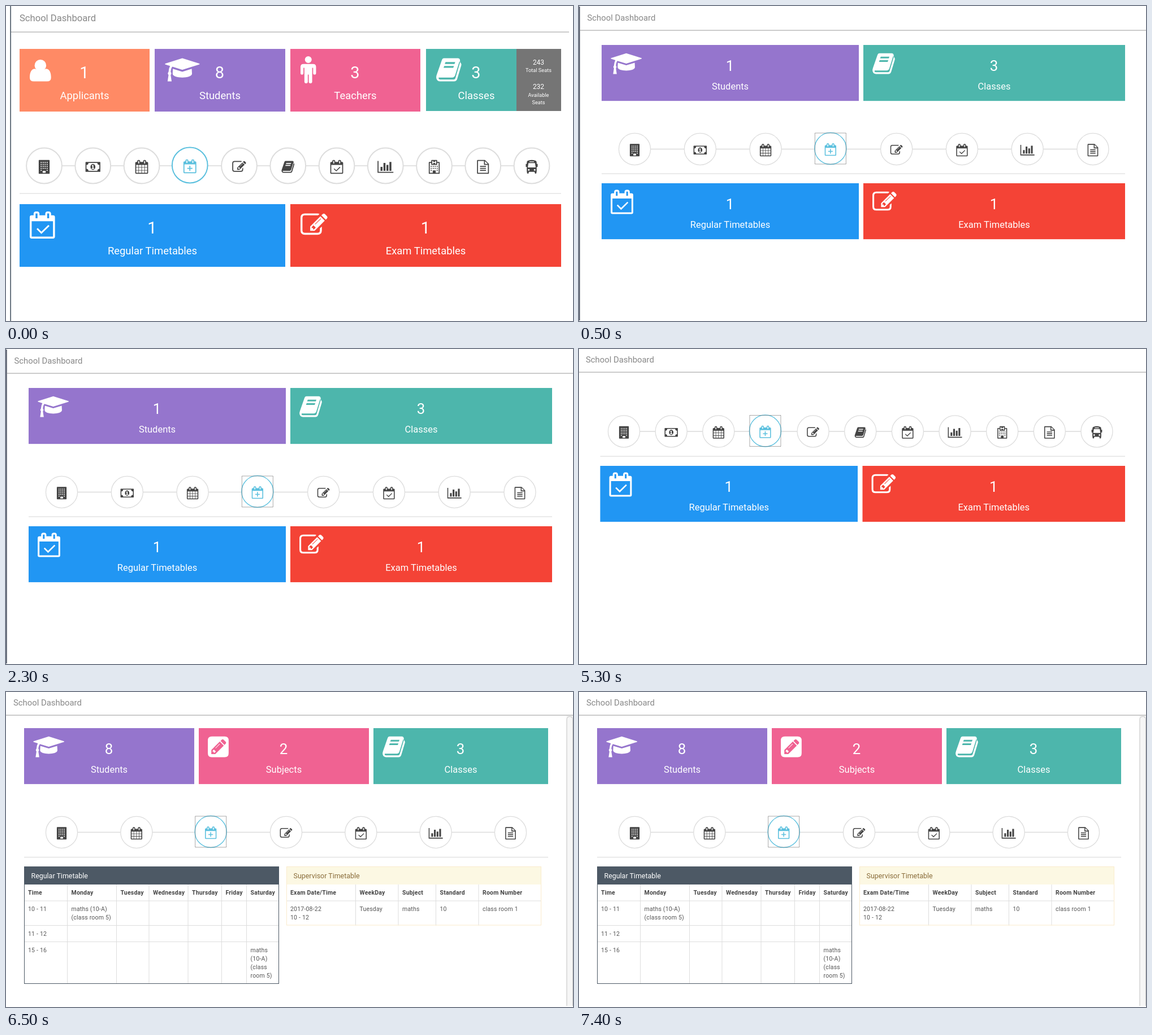
An HTML page that plays this animation: 1003x558 px, repeating every 8000 ms.

```html
<!DOCTYPE html>
<html lang="en">
<head>
<meta charset="utf-8">
<title>School Dashboard</title>
<style>
  html, body { margin: 0; width: 100%; height: 100%; overflow: hidden; background: #fff; }
  svg { display: block; width: 1003px; height: 558px; font-family: Roboto, sans-serif; }
  .cell { font-size: 10.5px; letter-spacing: .2px; }
</style>
</head>
<body>
<svg id="stage" viewBox="0 0 1003 558"></svg>
<script>
const BLUE = '#2196f3', RED = '#f44336', PURPLE = '#9575cd', PINK = '#f06292', TEAL = '#4db6ac';
const SLATE = '#4d5965', ACTIVE = '#5bc0de';

// Icons live on a 14-unit grid: [width, even-odd path]
const box = (x, y, w = 1, h = 1) => `M${x} ${y}h${w}v${h}h${-w}z`;
const grid = (xs, ys, w, h) => xs.map(x => ys.map(y => box(x, y, w, h)).join('')).join('');
const disc = (x, y, r, ry = r) => `M${x - r} ${y}a${r} ${ry} 0 0 1 ${2 * r} 0a${r} ${ry} 0 0 1 ${-2 * r} 0z`;
const planner = 'M1 2H2V1.2Q2.1 0 3.2 0H3.8Q4.9 0 5 1.2V2H8V1.2Q8.1 0 9.2 0H9.8Q10.9 0 11 1.2V2H12Q13 2 13 3V13Q13 14 12 14H1Q0 14 0 13V3Q0 2 1 2Z'
  + box(3, 1, 1, 2.5) + box(9, 1, 1, 2.5);
const icons = {
  building: [11, 'M.5 0H10.5Q11 0 11 .5V13.5Q11 14 10.5 14H.5Q0 14 0 13.5V.5Q0 0 .5 0Z'
    + grid([2, 4, 6, 8], [2, 4, 6, 8]) + grid([2, 8], [10]) + box(4, 11, 3, 2)],
  money: [15, 'M.5 2H14.5Q15 2 15 2.5V11.5Q15 12 14.5 12H.5Q0 12 0 11.5V2.5Q0 2 .5 2Z'
    + 'M3 3Q3 5 1 5V9Q3 9 3 11H12Q12 9 14 9V5Q12 5 12 3Z' + disc(7.5, 7, 2.5, 3)
    + 'M6.3 5.7L7.2 5H8V8.3H8.8V9.1H6.2V8.3H7V6.1L6.7 6.3Z'],
  calendar: [13, planner + [5, 7.75, 10.75].map((y, i) => [1, 3.75, 6.75, 9.75].map((x, j) =>
    box(x, y, j % 3 ? 2.5 : 2.25, i == 1 ? 2.5 : 2.25)).join('')).join('')],
  plus: [13, planner + box(1, 5, 11, 8) + 'M6 6.4h1v2.1h2.1v1H7v2.1H6V9.5H3.9v-1H6z'],
  check: [13, planner + box(1, 5, 11, 8) + 'M3.5 9.1L4.1 8.5 6 10.4 9.6 6.9 10.2 7.5 6 11.6Z'],
  edit: [14, 'M2.25 1H8.75Q9.3 1 9.8 1.3L9 2H2.25Q1 2 1 3.25V9.75Q1 11 2.25 11H8.75Q10 11 10 9.75V8.7L11 7.8V9.75Q11 12 8.75 12H2.25Q0 12 0 9.75V3.25Q0 1 2.25 1Z'
    + 'M10.25 2.5L12.5 4.75 7.25 10H5V7.75ZM6.94 9.25L7.84 8.34 6.66 7.16 5.75 8.06V8.5H6.5V9.25Z'
    + 'M10.4 3.6L7.4 6.5 7.6 6.7 10.6 3.8ZM13.7 3.55L13 4.25 10.75 2 11.45 1.3Q12 .9 12.55 1.3L13.7 2.45Q14.1 3 13.7 3.55Z'],
  book: [13, 'M4 1H11.3Q12.3 1.1 12.3 2.4V2.9L12.8 3.7Q13.1 4.2 12.9 4.8L10.8 11.8Q10.4 13 9.2 13H2Q.6 13 .1 11.5Q-.1 10.5 .3 9.5L2.8 2.3Q3.2 1 4 1Z'
    + 'M1.3 11H8.2Q9.4 11 9.8 9.7L12 2.6 12.3 3.2 10 11Q9.8 12 9 12H2Q1 11.9 1.3 11Z'
    + 'M4.8 3h5l-.35 1h-5zM4.15 5h5l-.35 1h-5z'],
  chart: [16, box(0, 1, 1, 12) + box(1, 12, 15, 1) + box(3, 7, 2, 4) + box(6, 3, 2, 8) + box(9, 5, 2, 6) + box(12, 2, 2, 9)],
  hospital: [11, 'M.5 2H2.5V.5Q2.5 0 3 0H8Q8.5 0 8.5 .5V2H10.5Q11 2 11 2.5V13.5Q11 14 10.5 14H.5Q0 14 0 13.5V2.5Q0 2 .5 2Z'
    + 'M1 3V13H4V10.5H7V13H10V3H8.5V5H2.5V3ZM3.5 1h1v1h2V1h1v3h-1V3h-2v1h-1z'
    + grid([2, 4, 6, 8], [6, 8]) + grid([2, 8], [10])],
  file: [12, 'M.75 0H8L12 4V13.25Q12 14 11.25 14H.75Q0 14 0 13.25V.75Q0 0 .75 0ZM1 1V13H11V5H7V1ZM8 1.1V4H10.9Z'
    + grid([3], [6, 8, 10], 6, 1)],
  bus: [12, 'M1 3Q1 .9 2.5 .6Q6 -.6 9.5 .6Q11 .9 11 3V4H12V7H11V12H10.8V13.2Q10 14.6 9 13.2V12H3V13.2Q2 14.6 1.2 13.2V12H1V7H0V4H1Z'
    + 'M2.7 3.2H9.3L10 7.6H2ZM3.7 1.4h4.6v.8H3.7z' + disc(3, 10, .9) + disc(9, 10, .9)],
  user: [11, 'M2.7 6.5Q2.9 6.5 3.4 6.9A3 3 0 1 1 7.6 6.9Q8.1 6.5 8.3 6.5C10.3 6.5 11 8.6 11 11Q11 13 8.9 13H2.1Q0 13 0 11C0 8.6 .7 6.5 2.7 6.5Z'],
  cap: [18, 'M.2 3.8L9 1 17.8 3.8Q18.1 4 17.8 4.2L9 7 3.9 5.4Q3.2 6 3 8.1Q3.7 8.9 3 9.7L3.5 13H1.4L1.9 9.7Q1.2 8.9 1.9 8.1Q2 6.2 2.7 5L.2 4.2Q-.1 4 .2 3.8Z'
    + 'M4.14 6.5L9 8 13.86 6.5 14 9C14 11.7 4 11.7 4 9Z'],
  person: [8, disc(4, 1.75, 1.75) + 'M1.5 4H6.5Q8 4 8 5.5V8.75a.75 .75 0 0 1-1.5 0V6H6V13.1a.87 .87 0 0 1-1.75 0V9.5h-.5v3.6a.87 .87 0 0 1-1.75 0V6H1.5V8.75a.75 .75 0 0 1-1.5 0V5.5Q0 4 1.5 4Z'],
  pencil: [12, 'M2.25 1H9.75Q12 1 12 3.25V10.75Q12 13 9.75 13H2.25Q0 13 0 10.75V3.25Q0 1 2.25 1Z'
    + 'M2 11.2V8.9L6.9 4 9.2 6.3 4.3 11.2ZM2.8 9.3L3.5 8.6 4.6 9.7 3.9 10.4H3.4V9.8H2.8Z'
    + 'M6.7 5.3L4.3 7.7 4.5 7.9 6.9 5.5ZM7.3 3.6L8.1 2.8Q8.6 2.5 9 2.8L10.4 4.2Q10.7 4.6 10.4 5.1L9.6 5.9Z']
};

const rect = (x, y, x2, y2, fill, extra = '') =>
  `<rect x="${x}" y="${y}" width="${x2 - x}" height="${y2 - y}" fill="${fill}" ${extra}/>`;
const text = (x, y, str, size, fill = '#fff', extra = 'text-anchor="middle"') =>
  `<text x="${x}" y="${y}" font-size="${size}" fill="${fill}" ${extra}>${str}</text>`;
const icon = (name, x, y, scale, fill = '#fff') =>
  `<path d="${icons[name][1]}" fill="${fill}" fill-rule="evenodd" transform="translate(${x} ${y}) scale(${scale})"/>`;

const header = (x, base, lineY, left, right, size) =>
  text(x, base, 'School Dashboard', size, '#888', '') + rect(left, lineY - .5, right, lineY + .7, '#aaa');

function card(x, x2, y, k, color, name, count, label) {
  const mid = (x + x2) / 2;
  return rect(x, y, x2, y + 111 * k, color)
    + icon(name, x + 18 * k, y + 13 * k, 3.43 * k)
    + text(mid - .5, y + 52 * k, count, 29 * k)
    + text(mid, y + 89 * k, label, 18.45 * k);
}

function steps(names, first, last, y, k, dividerY, left, right) {
  const r = 31.4 * k, gap = (last - first) / (names.length - 1);
  let out = rect(first, y - .8, last, y + .8, '#ddd');
  names.forEach((name, i) => {
    const on = name == 'plus', x = first + i * gap - on, cy = y - on, s = 1.75 * k;
    out += `<circle cx="${x}" cy="${cy}" r="${r}" fill="#fff" stroke="${on ? ACTIVE : '#ddd'}" stroke-width="${k == 1 ? 2 : 1.3}"/>`;
    if (on && k < 1) out += rect(x - 27.5, cy - 27.5, x + 27.5, cy + 27.5, 'none', 'stroke="#555" stroke-dasharray="1 1"');
    out += icon(name, x - icons[name][0] / 2 * s, cy + 2 * k - 7 * s, s, on ? ACTIVE : '#444');
  });
  return out + rect(left, dividerY - .5, right, dividerY + .7, '#ddd');
}

const timetables = (x, x2, x3, x4, y, k) =>
  card(x, x2, y, k, BLUE, 'check', 1, 'Regular Timetables') + card(x3, x4, y, k, RED, 'edit', 1, 'Exam Timetables');

// rows: arrays of cells, "|" breaks a line inside a cell
function table(title, cols, lines, rows, fill, ink, border) {
  const left = cols[0], right = cols[cols.length - 1], bottom = lines[lines.length - 1];
  let out = rect(left, 309, right, 341, fill) + text(left + 12.5, 330, title, 12.45, ink, '');
  lines.slice(1, -1).forEach(y => out += rect(left, y - .5, right, y + .5, '#ddd'));
  cols.slice(1, -1).forEach(x => out += rect(x - .5, 341, x + .5, bottom, '#ddd'));
  rows.forEach((row, r) => row.forEach((cell, c) => cell.split('|').forEach((line, i) =>
    out += text(cols[c] + 7, lines[r] + 18.3 + i * 15, line, 10.5, r ? '#555' : '#444',
      `class="cell" font-weight="${r ? 400 : 700}"`))));
  return out + rect(left + .5, 309.5, right - .5, bottom - .5, 'none', `stroke="${border}"`);
}

const K = .893;
const all = ['building', 'money', 'calendar', 'plus', 'edit', 'book', 'check', 'chart', 'hospital', 'file', 'bus'];
const without = (...drop) => all.filter(n => !drop.includes(n));

const admin = rect(7.3, 0, 9, 558, '#52606d') + header(24, 26.5, 46, 9, 996, 16.6)
  + card(24, 254, 76, 1, '#ff8a65', 'user', 1, 'Applicants')
  + card(263, 494, 76, 1, PURPLE, 'cap', 8, 'Students')
  + card(503, 733, 76, 1, PINK, 'person', 3, 'Teachers')
  + card(743, 921, 76, 1, TEAL, 'book', 3, 'Classes')
  + rect(903, 76, 982, 187, '#757575') + rect(743, 186, 982, 187, '#fff')
  + text(942, 103.5, 243, 12) + text(942, 117, 'Total Seats', 9.2)
  + text(942, 147, 232, 12) + text(942, 160.5, 'Available', 9.2) + text(942, 173.5, 'Seats', 9.2)
  + steps(all, 67.5, 930, 283, 1, 332, 24, 982)
  + timetables(24, 494, 503, 982, 351, 1);

const parent = rect(0, 1, 1.7, 557, '#555c6a') + header(14.5, 25.5, 43, 2, 1003, 14.85)
  + card(40, 495, 69, K, PURPLE, 'cap', 1, 'Students')
  + card(503, 966, 69, K, TEAL, 'book', 3, 'Classes')
  + steps(without('book', 'hospital', 'bus'), 98.5, 909, 253.5, K, 297, 40, 966)
  + timetables(40, 495, 503, 966, 314, K);

const staff = header(12, 24, 41, 0, 1003, 14.85)
  + steps(all, 79.5, 916, 146, K, 190, 37.5, 966)
  + timetables(37.5, 493, 501.5, 966, 207, K);

const teacher = header(13, 24, 41, 0, 1003, 14.85)
  + rect(991.5, 42, 1003, 556, '#f0f0f0') + rect(992, 43.5, 1002.5, 562, '#f6f6f6', 'rx="5" stroke="#c4c4c4"')
  + rect(985, 556, 1003, 558, '#fff')
  + card(32, 333, 64, K, PURPLE, 'cap', 8, 'Students')
  + card(341, 642, 64, K, PINK, 'pencil', 2, 'Subjects')
  + card(650, 959, 64, K, TEAL, 'book', 3, 'Classes')
  + steps(without('money', 'book', 'hospital', 'bus'), 98.5, 892.5, 248.5, K, 292.5, 32, 959)
  + table('Regular Timetable', [32, 108.5, 195.5, 253, 322, 381.5, 425.5, 483], [341, 370, 413.5, 442.5, 517], [
      ['Time', 'Monday', 'Tuesday', 'Wednesday', 'Thursday', 'Friday', 'Saturday'],
      ['10 - 11', 'maths (10-A)|(class room 5)'],
      ['11 - 12'],
      ['15 - 16', '', '', '', '', '', 'maths|(10-A)|(class|room 5)']
    ], SLATE, '#fff', SLATE)
  + table('Supervisor Timetable', [496, 618.5, 694, 760.5, 836, 947], [341, 370, 413.5], [
      ['Exam Date/Time', 'WeekDay', 'Subject', 'Standard', 'Room Number'],
      ['2017-08-22|10 - 12', 'Tuesday', 'maths', '10', 'class room 1']
    ], '#fcf8e3', '#8a6d3b', '#faebcc');

const slides = [[0, admin], [500, parent], [3500, staff], [6500, teacher]];
const stage = document.getElementById('stage');
stage.innerHTML = slides.map(([, body]) => `<g>${body}</g>`).join('');
const groups = [...stage.children];

function draw() {
  const t = performance.now() % 8000;
  const current = slides.filter(([start]) => t >= start).length - 1;
  groups.forEach((g, i) => g.style.display = i == current ? '' : 'none');
  requestAnimationFrame(draw);
}
draw();
</script>
</body>
</html>
```
